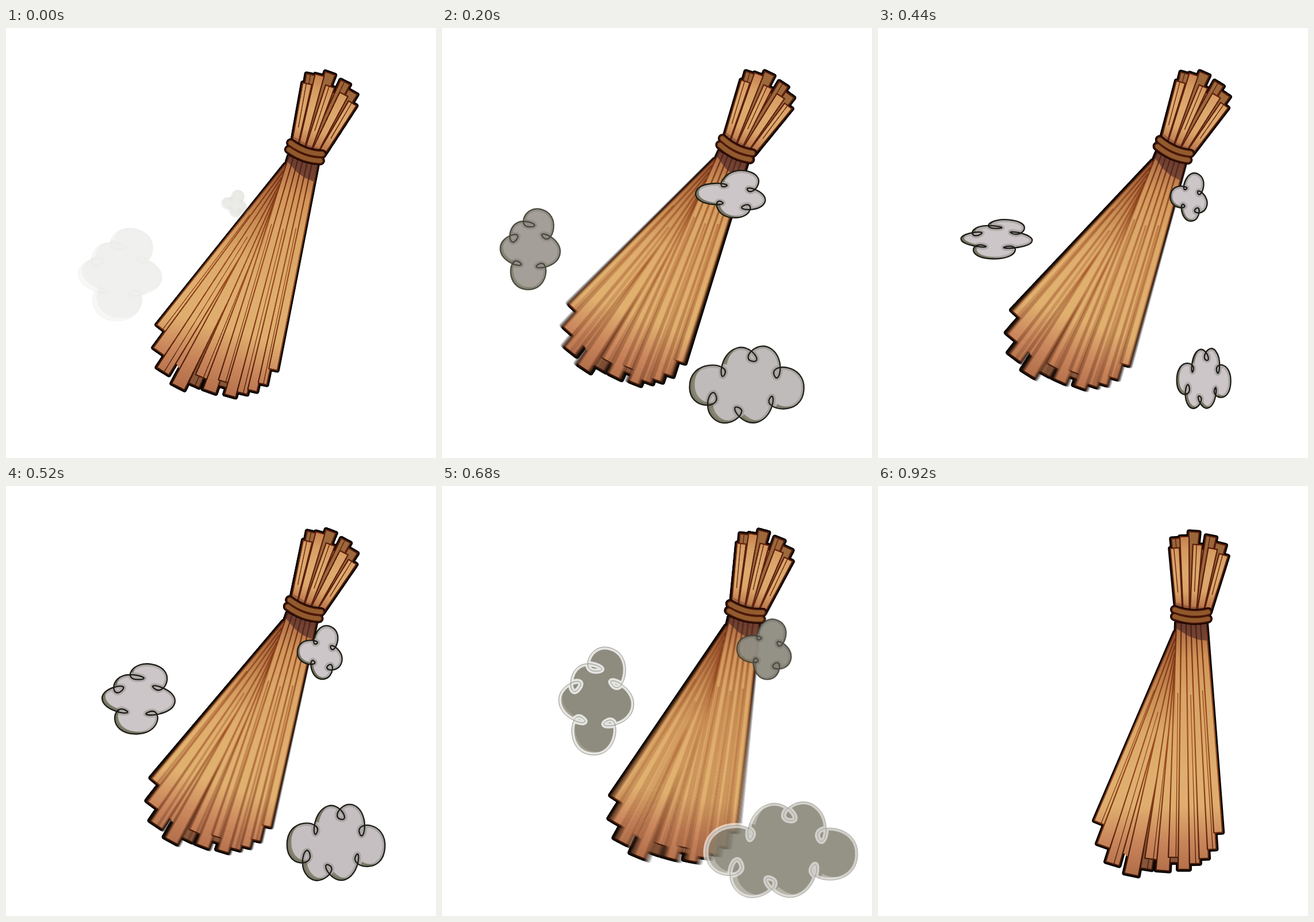
Write an HTML page with a canvas that moves like this. It is 748x748 px and loops after 1000 ms.

```html
<!DOCTYPE html>
<html>
<head>
<meta charset="utf-8">
<style>
html, body { margin: 0; height: 100%; overflow: hidden; background: #fff; }
canvas { display: block; width: 100vw; height: 100vh; }
</style>
</head>
<body>
<canvas id="stage" width="748" height="748"></canvas>
<script>
const SIZE = 748, PIVOT = [561, 131];
const ctx = document.getElementById('stage').getContext('2d');
const lerp = (a, b, u) => a + (b - a) * u;
const clamp = v => Math.max(0, Math.min(1, v));
const ease = (u, p = 1) => { const v = u ** p; return v * v * (3 - 2 * v); };

// ---- Broom, drawn once in its upright pose ----

// A straw tapers from its root to its end; w and rw are half widths.
function straw([x, y], rx, ry, w, rw) {
  const d = Math.hypot(x - rx, y - ry), ux = (x - rx) / d, uy = (y - ry) / d;
  const ex = x - ux * 3, ey = y - uy * 3;
  const p = new Path2D();
  p.moveTo(rx + uy * rw, ry - ux * rw);
  p.lineTo(ex + uy * w, ey - ux * w);
  p.lineTo(ex - uy * w, ey + ux * w);
  p.lineTo(rx - uy * rw, ry + ux * rw);
  p.closePath();
  const grain = new Path2D();
  grain.moveTo(lerp(rx, ex, .3), lerp(ry, ey, .3));
  grain.lineTo(ex + uy * w * .2, ey - ux * w * .2);
  return { p, grain };
}

// Left half fans out from the edge of the bundle, right half hangs from the cord.
const head = [[385, 589], [391, 629], [407, 660], [440, 679], [476, 652], [495, 672],
  [516, 649], [532, 670], [551, 660], [567, 651], [581, 635], [592, 606]]
  .map((end, i) => straw(end, i < 6 ? 521 : 524 + 8.4 * (i - 6), i < 6 ? 256 + 12 * i : 238,
    10 + 2.5 * Math.sin((i + 1) * Math.PI / 8), 5));
const backHead = [[466, 669], [515, 658]].map(end => straw(end, 521, 320, 10, 5));
const grip = [[516, 105], [533, 85], [556, 99], [583, 106], [602, 117]]
  .map((end, i) => straw(end, 524 + 12.2 * i, 218, 8, 5.5));
const backGrip = [[519, 88], [550, 77], [580, 85], [597, 98]]
  .map((end, i) => straw(end, 528 + 13 * i, 218, 9, 5));

function makeBroom() {
  const cv = document.createElement('canvas');
  cv.width = cv.height = SIZE * 2;
  const g = cv.getContext('2d');
  g.scale(2, 2);
  g.lineJoin = g.lineCap = 'round';

  const ramp = (y0, y1, ...colors) => {
    const gr = g.createLinearGradient(0, y0, 0, y1);
    colors.forEach((c, i) => gr.addColorStop(i / (colors.length - 1), c));
    return gr;
  };
  const poly = (fill, ...p) => {
    g.beginPath();
    for (let i = 0; i < p.length; i += 2) g.lineTo(p[i], p[i + 1]);
    g.fillStyle = fill;
    g.fill();
  };
  const draw = (straws, fill, line) => straws.forEach(({ p, grain }, i) => {
    g.fillStyle = fill;
    g.fill(p);
    g.strokeStyle = line;
    g.lineWidth = 2.2;
    g.stroke(p);
    g.lineWidth = 1.3;
    if (i % 2 == 0) g.stroke(grain);
  });

  g.strokeStyle = '#0a0705';
  g.lineWidth = 8;
  [...backHead, ...head, ...backGrip, ...grip].forEach(s => g.stroke(s.p));

  const wood = ramp(235, 685, '#a56540', '#d09458', '#d9a566', '#dba96a', '#dfae6e', '#dfae6e', '#c8845a', '#ad6a46');
  const headLine = ramp(235, 685, '#5a1d0c', '#8a3d18', '#a0501f', '#94461c', '#6a2c10', '#2c1006');
  poly(wood, 521, 245, 570, 245, 588, 595, 570, 640, 440, 650, 400, 615);
  draw(backHead, '#87563a', headLine);
  draw(head, wood, headLine);
  poly(ramp(250, 430, 'rgba(120,52,24,.6)', 'rgba(150,70,30,0)'), 517, 252, 518, 430, 440, 430);
  poly('rgba(66,32,34,.58)', 519, 238, 570, 240, 572, 269, 556, 267, 540, 261, 518, 247);

  poly('#a8683c', 520, 218, 514, 115, 556, 108, 600, 124, 576, 218);
  draw(backGrip, '#9a673a', '#5a1d0c');
  draw(grip, ramp(80, 218, '#c07a4a', '#d59c62', '#dca96c', '#d9a468', '#b06c44'), '#5a1d0c');
  poly('rgba(90,40,30,.35)', 519, 203, 545, 210, 579, 211, 576, 222, 520, 218);

  // Cord in two turns
  const turn = (color, width, y) => {
    g.beginPath();
    g.moveTo(516, y);
    g.quadraticCurveTo(545, y + 11, 574, y + 4);
    g.strokeStyle = color;
    g.lineWidth = width;
    g.stroke();
  };
  const turns = [227, 215];
  turns.forEach(y => turn('#160703', 16, y));
  turns.forEach(y => { turn('#4a1608', 12, y); turn('#8f592c', 8, y); });
  return cv;
}
const broom = makeBroom();

function swing(t) {
  if (t < 280) return lerp(15.5, 24.2, ease(t / 280, 1.2));
  if (t < 600) return lerp(24.2, 15.5, ease((t - 280) / 320));
  return lerp(15.5, 0, ease(clamp((t - 600) / 320), .7));
}

// Fast moves are smeared by averaging several angles.
function drawBroom(t) {
  const from = swing(Math.max(0, t - 8)), to = swing(t + 8);
  const n = Math.abs(to - from) > .15 ? 9 : 1;
  for (let i = 0; i < n; i++) {
    const a = n > 1 ? lerp(from, to, i / (n - 1)) : swing(t);
    ctx.save();
    ctx.globalAlpha = 1 / (i + 1);
    ctx.translate(...PIVOT);
    ctx.rotate(a * Math.PI / 180);
    ctx.drawImage(broom, -PIVOT[0], -PIVOT[1], SIZE, SIZE);
    ctx.restore();
  }
}

// ---- Dust clouds ----

// Lobes run clockwise around the centre (0, 0); the line curls inward between two crowns.
function cloudPath(crowns, curl) {
  const pts = crowns.flatMap(([x, y], i) => {
    const [nx, ny] = crowns[(i + 1) % crowns.length];
    return [[x, y], [(x + nx) * .33, (y + ny) * .33]];
  });
  const along = ([x, y], k) => {
    const d = Math.hypot(x, y);
    return [x - y / d * k, y + x / d * k];
  };
  const path = new Path2D();
  path.moveTo(...pts[0]);
  pts.forEach((p, i) => {
    const q = pts[(i + 1) % pts.length];
    const reach = .75 * Math.hypot(q[0] - p[0], q[1] - p[1]);
    const [c, d] = i % 2 ? [along(p, -curl), along(q, -reach)] : [along(p, reach), along(q, curl)];
    path.bezierCurveTo(...c, ...d, ...q);
  });
  path.closePath();
  return path;
}

// Poses hold centre x, y, width and height at these times.
const TIMES = [0, 280, 440, 600];
const clouds = [
  {
    size: [135, 190], born: 120, gone: 700, fade: 130,
    path: cloudPath([[23, -92], [65, 13], [-7, 95], [-65, -2], [-25, -62]], 28),
    poses: [[198, 428, 151, 163], [140, 371, 95, 136], [206, 367, 128, 69], [260, 373, 135, 190]]
  },
  {
    size: [97, 104], born: 40, gone: 720, fade: 45,
    path: cloudPath([[24, -51], [44, 22], [9, 51], [-48, -3]], 16),
    poses: [[397, 306, 45, 47], [534, 285, 148, 92], [541, 295, 66, 83], [553, 285, 97, 104]]
  },
  {
    size: [267, 165], born: 60, gone: 670, fade: 50,
    path: cloudPath([[-23, -82], [57, -79], [131, 8], [25, 79], [-83, 66], [-133, 5]], 28),
    poses: [[510, 636, 368, 176], [537, 618, 152, 119], [567, 611, 95, 103], [584, 635, 267, 165]]
  }
];

function drawCloud({ size, path, poses, born, gone, fade }, t) {
  const age = Math.min(t - born, gone - t);
  const alpha = clamp(1 + age / fade), tone = clamp(age / 160);
  if (!alpha) return;
  const i = t < 280 ? 0 : t < 440 ? 1 : 2;
  const u = ease(clamp((t - TIMES[i]) / (TIMES[i + 1] - TIMES[i])), 1.1);
  const [x, y, w, h] = poses[i].map((v, j) => lerp(v, poses[i + 1][j], u));
  const drift = Math.max(0, t - 600) * .1;
  const place = (dx, dy) => {
    const p = new Path2D();
    p.addPath(path, new DOMMatrix([w / size[0], 0, 0, h / size[1], x + drift + dx, y + dy]));
    return p;
  };
  const shape = place(0, 0);
  const stroke = (color, width) => {
    ctx.strokeStyle = color;
    ctx.lineWidth = width;
    ctx.stroke(shape);
  };
  ctx.save();
  ctx.globalAlpha = alpha * lerp(.75, 1, tone);
  ctx.lineJoin = 'round';
  ctx.fillStyle = '#85836f';
  ctx.fill(shape);
  ctx.save();
  ctx.clip(shape);
  ctx.fillStyle = `rgb(${lerp(127, 205, tone)},${lerp(125, 198, tone)},${lerp(112, 200, tone)})`;
  ctx.fill(place(w * .045, -h * .03));
  stroke('rgba(70,70,60,.22)', 9);
  ctx.restore();
  if (tone < .2) {
    stroke('#fff', 9);
    stroke('#77776c', 1);
  } else {
    stroke(tone > .8 ? '#1c1c16' : '#3d3d33', 2.3);
  }
  ctx.restore();
}

function frame(now) {
  const t = Math.min(920, Math.floor(now % 1000 / 40) * 40);
  ctx.fillStyle = '#fff';
  ctx.fillRect(0, 0, SIZE, SIZE);
  drawBroom(t);
  clouds.forEach(c => drawCloud(c, t));
  requestAnimationFrame(frame);
}
requestAnimationFrame(frame);
</script>
</body>
</html>
```
